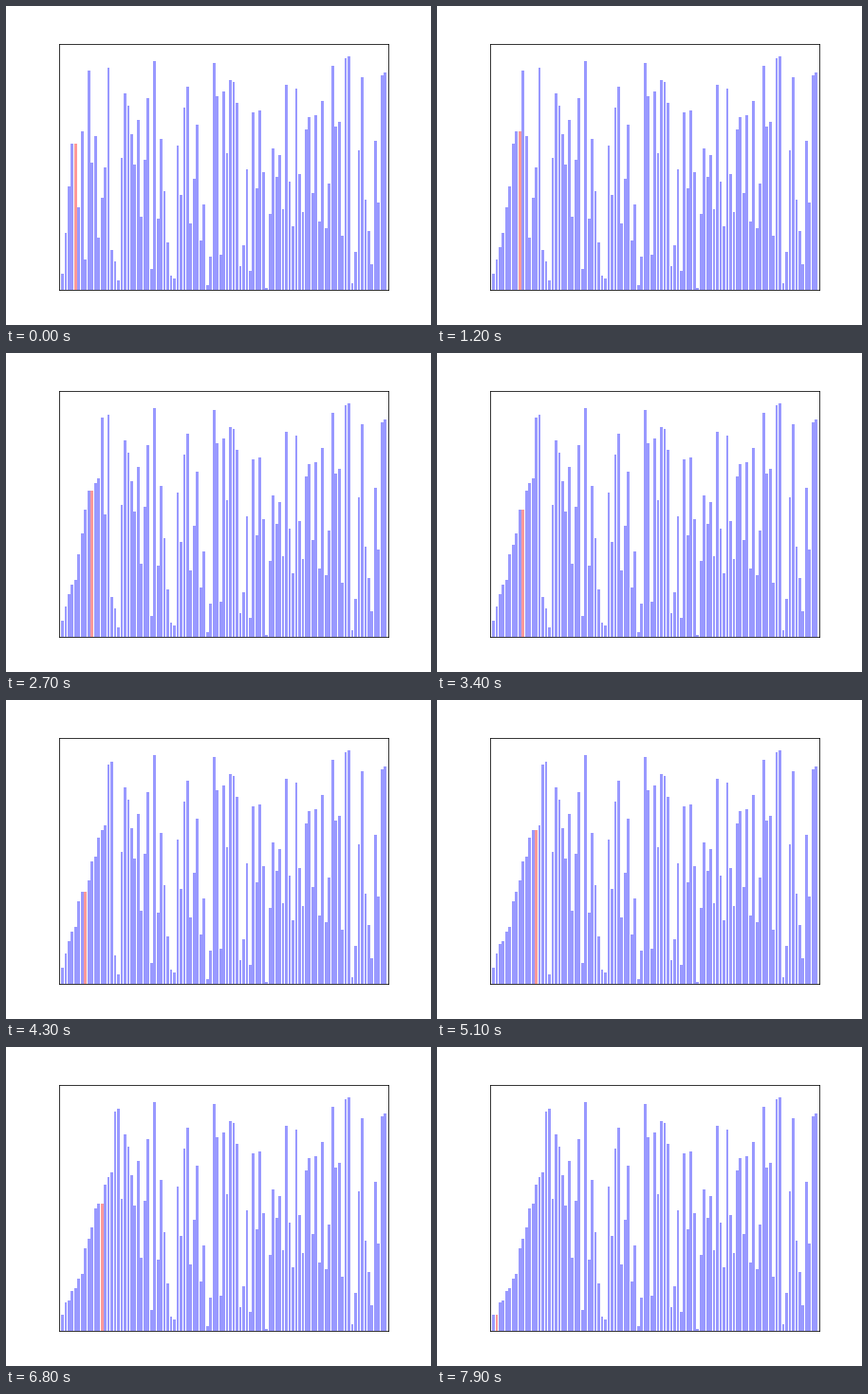
Animation of 448 by 336 pixels, one loop 8 s. Source, as a matplotlib script:

```python
import matplotlib.pyplot as plt
from matplotlib.animation import FuncAnimation

FRAMES = 80
INTERVAL = 100

# A shuffle of 1..99 whose first four values are already in order.
VALUES = [
    7, 24, 44, 62, 18, 35, 67, 13, 93, 54, 65, 22, 39, 52, 94, 17, 12, 4, 56, 83,
    78, 66, 53, 72, 31, 55, 81, 9, 97, 30, 64, 42, 20, 6, 5, 61, 40, 77, 86, 28,
    47, 70, 21, 36, 2, 14, 96, 82, 15, 84, 58, 89, 88, 79, 10, 19, 51, 8, 75, 43,
    76, 50, 1, 32, 60, 48, 57, 34, 87, 46, 27, 85, 49, 33, 68, 73, 41, 74, 29, 80,
    26, 45, 95, 69, 71, 23, 98, 99, 3, 16, 59, 90, 38, 25, 11, 63, 37, 91, 92,
]


def insertion_sort(values):
    """Yield the array and the active slot after every shift."""
    a = list(values)
    for i in range(1, len(a)):
        key, j = a[i], i
        while j > 0 and a[j - 1] > key:
            a[j] = a[j - 1]
            yield list(a), j
            j -= 1
        a[j] = key


steps = [step for step, _ in zip(insertion_sort(VALUES), range(FRAMES))]

fig, ax = plt.subplots(figsize=(6.4, 4.8), dpi=70)
ax.set(xlim=(0, len(VALUES) + 1), ylim=(0, max(VALUES) * 1.05), xticks=[], yticks=[])
bars = ax.bar(range(1, len(VALUES) + 1), VALUES, width=0.8, color="b", alpha=0.4)


def update(frame):
    heights, active = steps[frame]
    for i, (bar, height) in enumerate(zip(bars, heights)):
        bar.set_height(height)
        bar.set_facecolor("r" if i == active else "b")
    return bars


anim = FuncAnimation(fig, update, frames=FRAMES, interval=INTERVAL,
                     init_func=lambda: update(0), repeat=True, repeat_delay=0)
plt.show()
```
